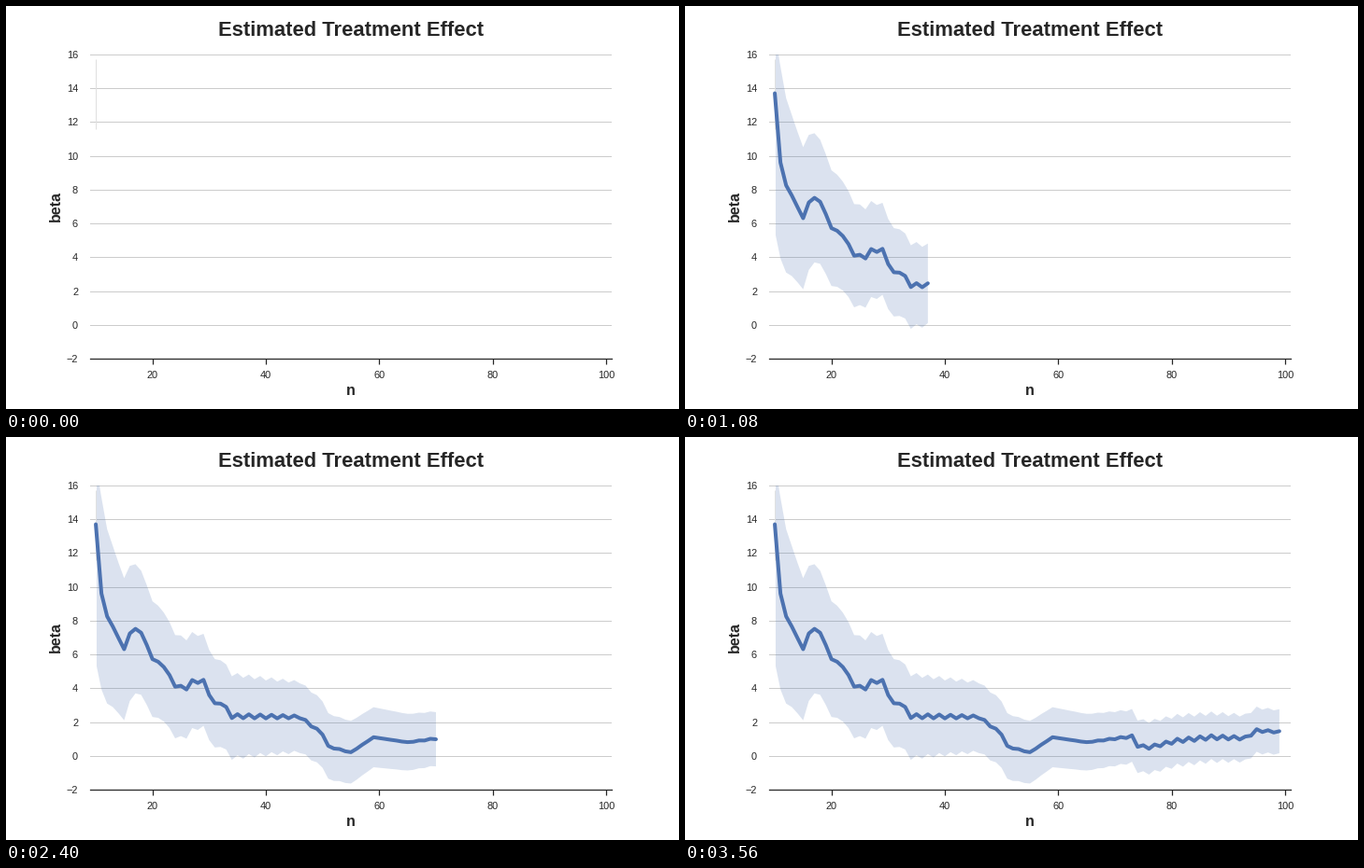
Animation of 720 by 432 pixels, one loop 4510 ms. Source, as a matplotlib script:

```python
import matplotlib.pyplot as plt
import numpy as np
from matplotlib.animation import FuncAnimation
from matplotlib.patches import Polygon

W, H, DPI = 720, 432, 72
BLUE, INK, GRID = "#4c72b0", "0.15", "0.8"
TICK_MS, STEP_TICKS, LOOP_MS = 10, 4, 4510

plt.rcParams.update({
    "font.family": "Liberation Sans",
    "text.color": INK,
    "axes.edgecolor": INK,
    "axes.labelcolor": INK,
    "axes.axisbelow": True,
})

# Turning points (n, beta) of the estimate
TURNS = [
    (10, 13.7), (11, 9.6), (12, 8.25), (13, 7.65), (15, 6.3), (16, 7.25),
    (17, 7.5), (18, 7.3), (20, 5.75), (22, 5.3), (24, 4.15), (26, 4.0),
    (27, 4.4), (29, 4.4), (31, 3.0), (32, 3.2), (34, 2.35), (46, 2.3),
    (50, 1.3), (51, 0.55), (55, 0.2), (59, 1.1), (65, 0.8), (73, 1.15),
    (74, 0.6), (76, 0.5), (81, 0.9), (87, 1.1), (93, 1.05), (95, 1.5), (99, 1.41),
]


def estimate(n):
    """Linear trend between turning points plus a zigzag that swells and fades."""
    zigzag = -0.12 * np.cos(np.pi * n) * np.cos(np.pi * (n - 36) / 49) ** 2
    return np.interp(n, *zip(*TURNS)) + zigzag


def half_width(n):
    return 3.4 * (20 / n) ** 0.6 + 1.2 * np.exp(-(n - 10) / 2.5)


n = np.arange(10, 100)
beta = estimate(n)
low, high = beta - half_width(n), beta + half_width(n)

# The band opens wide, just right of the first estimate
band_x = n.astype(float)
band_x[0], low[0], high[0] = 10.15, 5.3, 17

fig = plt.figure(figsize=(W / DPI, H / DPI), dpi=DPI, facecolor="white")
ax = fig.add_axes([0.125, 0.125, 0.775, 0.755])
ax.set(xlim=(9, 101), ylim=(-2, 16),
       xticks=range(20, 101, 20), yticks=range(-2, 17, 2))
ax.grid(axis="y", color=GRID, linewidth=1)
ax.spines[["left", "right", "top"]].set_visible(False)
ax.spines["bottom"].set_linewidth(1.25)
ax.tick_params(labelsize=11, labelcolor=INK, color=INK)
ax.tick_params(axis="x", length=6, width=1.25, pad=7)
ax.tick_params(axis="y", length=0, pad=13)
ax.set_title("Estimated Treatment Effect", fontsize=22, fontweight="bold", pad=20)
ax.set_xlabel("n", fontsize=16, fontweight="bold", labelpad=4)
ax.set_ylabel("beta", fontsize=16, fontweight="bold", labelpad=4)

ax.plot([10, 10], [11.6, 15.7], color="0.88", linewidth=1, solid_capstyle="butt")
band = ax.add_patch(Polygon(np.zeros((3, 2)), facecolor=BLUE, alpha=0.2, linewidth=0))
line, = ax.plot([], [], color=BLUE, linewidth=4, solid_capstyle="round",
                solid_joinstyle="round")


def update(tick):
    count = min(tick // STEP_TICKS + 1, len(n))
    for artist in (band, line):
        artist.set_visible(count > 1)
    line.set_data(n[:count], beta[:count])
    upper = np.column_stack([band_x, high])[:count]
    lower = np.column_stack([band_x, low])[:count]
    band.set_xy(np.vstack([upper, lower[::-1]]))
    return band, line


anim = FuncAnimation(fig, update, frames=LOOP_MS // TICK_MS, interval=TICK_MS,
                     repeat=True, repeat_delay=0, blit=True)
plt.show()
```
